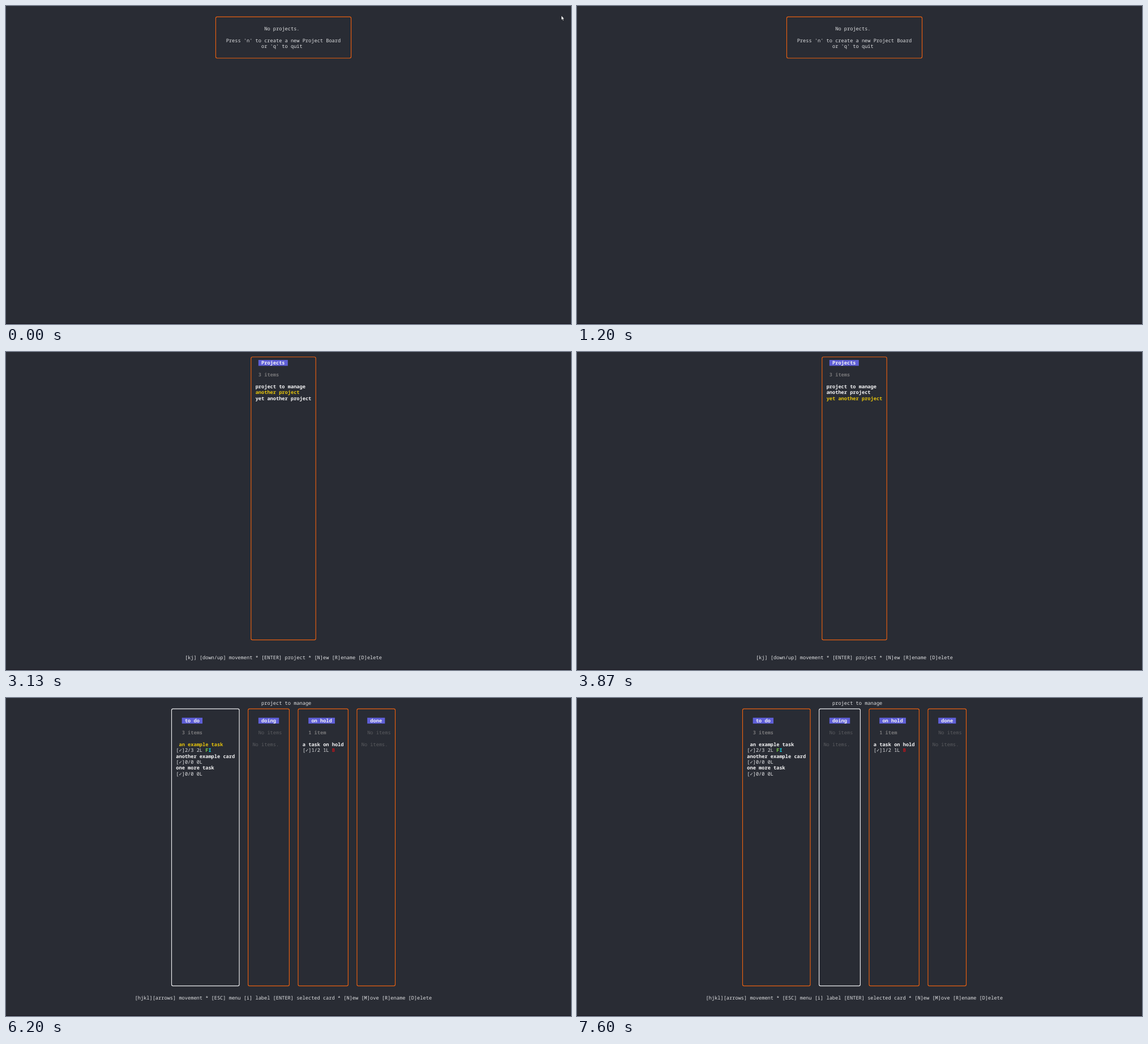
Recreate the animation shown at these times as an HTML page. Size 998 by 561 pixels, loop 8 s.

```html
<!DOCTYPE html>
<html lang="en">
<head>
<meta charset="utf-8">
<title>Terminal project board</title>
<style>
html, body { margin: 0; width: 100%; height: 100%; overflow: hidden; background: #292c34; }
svg { display: block; width: 998px; height: 561px; }
text {
  font: 8.663px "Noto Sans Mono", "DejaVu Sans Mono", monospace;
  fill: #dfe0e2; white-space: pre; text-rendering: geometricPrecision;
}
.bold { font-weight: 700; fill: #f4f4f5; }
.count { font-weight: 600; fill: #777779; }
.dim { fill: #5b5c60; }
.green { font-weight: 600; fill: #78cc48; }
.cyan { font-weight: 600; fill: #10dcec; }
.red { font-weight: 600; fill: #c3141a; }
.tag { fill: #5f5fd7; }
.box { fill: none; stroke: #ea6010; stroke-width: 1.15; }

#empty, #menu, #board, #item0, #item1, #item2, #card, #col0, #col1, #pointer, #thumb {
  animation: 8s step-end infinite;
}
#empty { animation-name: empty; }
#menu { animation-name: menu; }
#board { animation-name: board; }
#item0 { animation-name: item0; }
#item1 { animation-name: item1; }
#item2 { animation-name: item2; }
#card { animation-name: card; }
#col0 { animation-name: col0; }
#col1 { animation-name: col1; }
#pointer { animation-name: pointer; }
#thumb { animation-name: thumb; }

@keyframes empty { 0% { visibility: visible } 25%, 100% { visibility: hidden } }
@keyframes menu { 0% { visibility: hidden } 25% { visibility: visible } 77.5%, 100% { visibility: hidden } }
@keyframes board { 0% { visibility: hidden } 77.5%, 100% { visibility: visible } }
@keyframes item0 { 0% { fill: #e5c30c } 39.125% { fill: #f4f4f5 } 60%, 100% { fill: #e5c30c } }
@keyframes item1 { 0% { fill: #f4f4f5 } 39.125% { fill: #e5c30c } 48.375%, 100% { fill: #f4f4f5 } }
@keyframes item2 { 0% { fill: #f4f4f5 } 48.375% { fill: #e5c30c } 60%, 100% { fill: #f4f4f5 } }
@keyframes card { 0% { fill: #e5c30c } 94.125%, 100% { fill: #f4f4f5 } }
@keyframes col0 { 0% { stroke: #f0f0f2 } 94.125%, 100% { stroke: #ea6010 } }
@keyframes col1 { 0% { stroke: #ea6010 } 94.125%, 100% { stroke: #f0f0f2 } }
@keyframes pointer {
  0% { transform: translate(981px, 17px); opacity: 1 }
  .875% { transform: translate(978px, 15.5px); opacity: 1 }
  5% { transform: translate(986px, 14px); opacity: 1 }
  5.8125% { transform: translate(993px, 12px); opacity: 1 }
  6.625%, 100% { transform: translate(999px, 10px); opacity: 0 }
}
@keyframes thumb {
  0% { opacity: 0 }
  5.8125% { opacity: .6 }
  6.625% { opacity: 1 }
  14.125% { opacity: .45 }
  15%, 100% { opacity: 0 }
}
</style>
</head>
<body>
<svg viewBox="0 0 998 561">
  <rect width="998" height="561" fill="#292c34"/>
  <g id="empty"></g>
  <g id="menu"></g>
  <g id="board"></g>
  <rect y="560" width="998" height="1" fill="#1b1822"/>
  <rect id="thumb" x="993" y="5" width="2" height="551" rx="1" fill="#85868b"/>
  <path id="pointer" d="M0 0V7.6L1.7 6.1L2.9 9L4.2 8.5L3 5.7H5.2Z"
        fill="#fff" stroke="#15161a" stroke-width=".5"/>
</svg>
<script>
const CW = 5.198, CH = 10.396;
const left = c => 4 + CW * c;
const top_ = r => 3.6 + CH * r;

function add(parent, name, attrs, content) {
  const el = document.createElementNS("http://www.w3.org/2000/svg", name);
  for (const key in attrs) el.setAttribute(key, attrs[key]);
  if (content) el.textContent = content;
  parent.append(el);
}

// Columns and rows are terminal cells.
function screen(id) {
  const g = document.getElementById(id);
  return {
    text(c, r, str, cls = "", id = "") {
      add(g, "text", { x: left(c), y: top_(r) + 8.4, class: cls, id }, str);
    },
    box(c1, r1, c2, r2, id = "") {
      add(g, "rect", {
        x: left(c1 + .5), y: top_(r1 + .5),
        width: CW * (c2 - c1), height: CH * (r2 - r1), rx: 2.6, class: "box", id
      });
    },
    tag(c, r, str) {
      add(g, "rect", { x: left(c), y: top_(r), width: CW * (str.length + 2), height: CH, class: "tag" });
      this.text(c + 1, r, str, "bold");
    }
  };
}

const empty = screen("empty");
empty.box(70, 1, 116, 8);
empty.text(87, 3, "No projects.");
empty.text(74, 5, "Press 'n' to create a new Project Board");
empty.text(86, 6, "or 'q' to quit");

const menu = screen("menu");
menu.box(82, 0, 104, 48);
menu.tag(85, 1, "Projects");
menu.text(85, 3, "3 items", "count");
["project to manage", "another project", "yet another project"]
  .forEach((name, i) => menu.text(84, 5 + i, name, "bold", "item" + i));
menu.text(60, 51, "[kj] [down/up] movement * [ENTER] project * [N]ew [R]ename [D]elete");

const board = screen("board");
board.text(86, 0, "project to manage");
[
  [55, 78, 59, "to do", "3 items"],
  [81, 95, 85, "doing", ""],
  [98, 115, 102, "on hold", "1 item"],
  [118, 131, 122, "done", ""]
].forEach(([c1, c2, c, title, count], i) => {
  board.box(c1, 1, c2, 48, "col" + i);
  board.tag(c, 3, title);
  board.text(c, 5, count || "No items", count ? "count" : "dim");
  if (!count) board.text(c1 + 2, 7, "No items.", "dim");
});
board.text(58, 7, "an example task", "bold", "card");
board.text(57, 8, "[✓]2/3 2L");
board.text(67, 8, "F", "green");
board.text(68, 8, "I", "cyan");
board.text(57, 9, "another example card", "bold");
board.text(57, 10, "[✓]0/0 0L");
board.text(57, 11, "one more task", "bold");
board.text(57, 12, "[✓]0/0 0L");
board.text(100, 7, "a task on hold", "bold");
board.text(100, 8, "[✓]1/2 1L");
board.text(110, 8, "B", "red");
board.text(43, 50, "[hjkl][arrows] movement * [ESC] menu [i] label [ENTER] selected card * [N]ew [M]ove [R]ename [D]elete");
</script>
</body>
</html>
```
